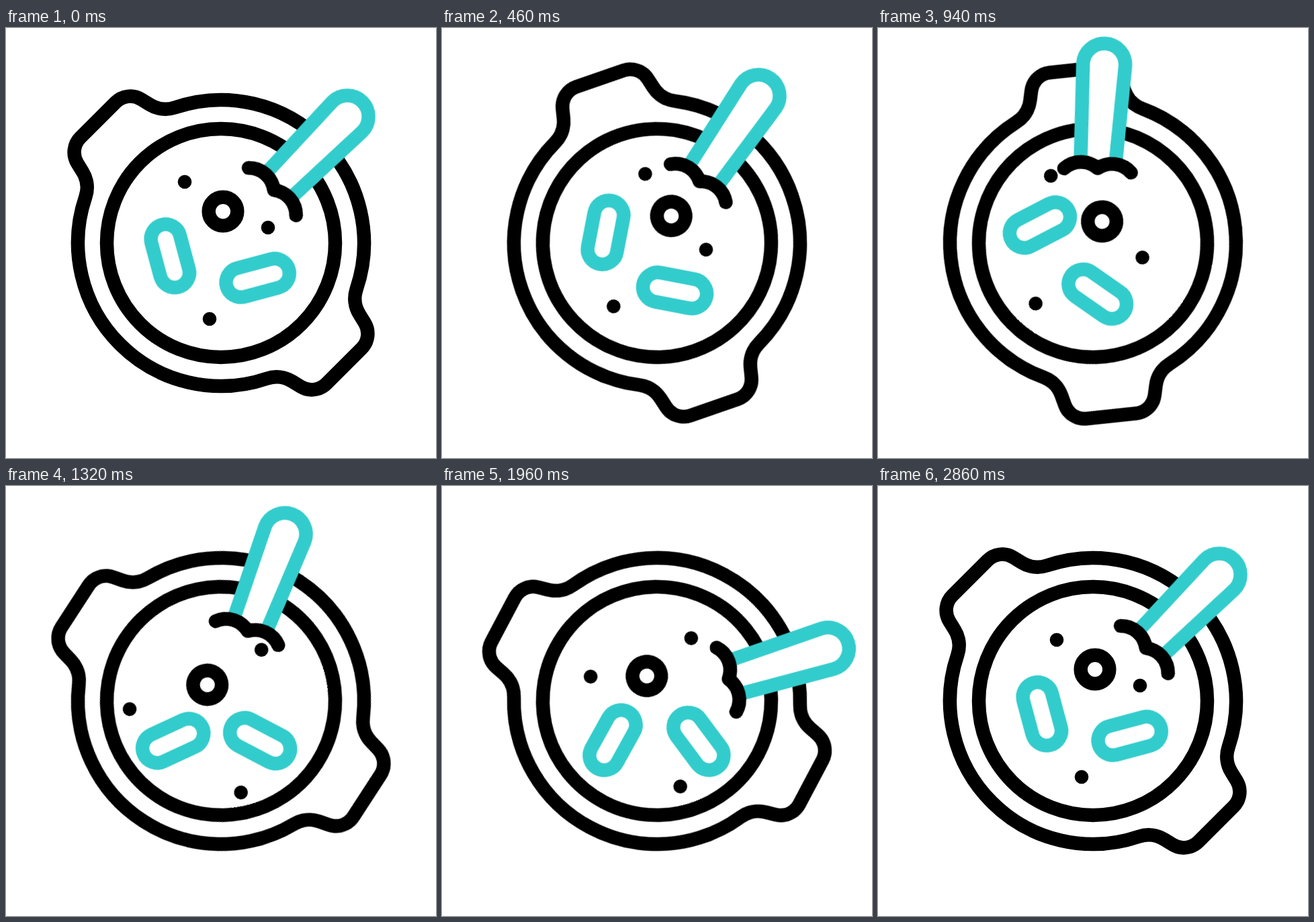
Recreate the animation shown at these times as an HTML page. Size 640 px wide and 640 px high, loop 3600 ms.

```html
<!DOCTYPE html>
<html lang="en">
<head>
<meta charset="utf-8">
<title>Stirring pot</title>
<style>
  html, body { margin: 0; width: 100%; height: 100%; overflow: hidden; background: #fff; }
  svg { display: block; width: 100vw; height: 100vh; }

  .line { fill: none; stroke: #000; stroke-width: 20.5; stroke-linecap: round; stroke-linejoin: round; }
  .teal { stroke: #33cccc; stroke-linecap: butt; }

  /* every part shares one 3.6 s loop; most segments ease like a smoothstep */
  .pot, .spoon, .drift, .turn {
    animation: 3600ms cubic-bezier(.333, 0, .667, 1) infinite;
    transform-origin: 0 0;
  }
  .pot { animation-name: pot; }
  .spoon { animation-name: spoon; }
  .early { animation-name: early; }
  .middle { animation-name: middle; }
  .late { animation-name: late; }
  .turn-a { animation-name: turn-a; }
  .turn-b { animation-name: turn-b; }

  @keyframes pot {
    0% { transform: rotate(0deg); animation-timing-function: cubic-bezier(.39, 0, .667, 1); }
    22.5% { transform: rotate(45deg); }
    43.33% { transform: rotate(-30deg); animation-timing-function: cubic-bezier(.39, 0, .3, 1); }
    75%, 100% { transform: rotate(0deg); }
  }
  @keyframes spoon {
    0% { transform: rotate(45deg); animation-timing-function: cubic-bezier(.56, 0, .7, 1); }
    30.56% { transform: rotate(0deg); }
    48.19% { transform: rotate(75deg); animation-timing-function: cubic-bezier(.55, 0, .36, 1); }
    77.78%, 100% { transform: rotate(45deg); }
  }

  /* ingredients slide out by --x, --y and back, in three waves */
  @keyframes early {
    0%, 7.78% { transform: translate(0px, 0px); }
    36.39% { transform: translate(var(--x), var(--y)); }
    66.94%, 100% { transform: translate(0px, 0px); }
  }
  @keyframes middle {
    0%, 15% { transform: translate(0px, 0px); }
    42.5% { transform: translate(var(--x), var(--y)); }
    71.53%, 100% { transform: translate(0px, 0px); }
  }
  @keyframes late {
    0%, 20.69% { transform: translate(0px, 0px); }
    47.92% { transform: translate(var(--x), var(--y)); animation-timing-function: cubic-bezier(.25, 0, .54, 1); }
    79.44%, 100% { transform: translate(0px, 0px); }
  }
  @keyframes turn-a {
    0%, 14.44% { transform: rotate(0deg); }
    42.92% { transform: rotate(105deg); }
    68.89%, 100% { transform: rotate(0deg); }
  }
  @keyframes turn-b {
    0%, 19.58% { transform: rotate(0deg); }
    50.42% { transform: rotate(94deg); }
    72.22%, 100% { transform: rotate(0deg); }
  }
</style>
</head>
<body>
<svg viewBox="-320 -320 640 640">
  <g class="pot">
    <path class="line" transform="rotate(45)" d="M191.1 94
      A44 44 0 0 1 220.6 70.7 L235.1 67.2 A31 31 0 0 0 259 37
      V-37 A31 31 0 0 0 235.1 -67.2 L220.6 -70.7 A44 44 0 0 1 191.1 -94
      A213 213 0 0 0 -191.1 -94
      A44 44 0 0 1 -220.6 -70.7 L-235.1 -67.2 A31 31 0 0 0 -259 -37
      V37 A31 31 0 0 0 -235.1 67.2 L-220.6 70.7 A44 44 0 0 1 -191.1 94
      A213 213 0 0 0 191.1 94 Z"/>
    <circle class="line" r="170"/>

    <g class="drift early" style="--x:-81.5px;--y:74.5px"><circle cx="-54" cy="-91" r="10.3"/></g>
    <g class="drift early" style="--x:-17.8px;--y:19.2px"><circle class="line" cx="3" cy="-47" r="21.3"/></g>
    <g class="drift middle" style="--x:20px;--y:29.7px"><circle cx="-17" cy="113" r="10.3"/></g>
    <g class="drift late" style="--x:7.5px;--y:-62px"><circle cx="70" cy="-23" r="10.3"/></g>

    <g class="drift middle" style="--x:-7.2px;--y:27px">
      <g transform="translate(-75.7 19.2) rotate(75)">
        <rect class="line teal turn turn-a" x="-48" y="-22" width="96" height="44" rx="22"/>
      </g>
    </g>
    <g class="drift late" style="--x:-16px;--y:28.5px">
      <g transform="translate(54.7 52) rotate(-15)">
        <rect class="line teal turn turn-b" x="-48" y="-22" width="96" height="44" rx="22"/>
      </g>
    </g>
  </g>

  <g class="spoon">
    <path class="line teal" style="fill:#fff" d="M-26 -118 L-31.5 -266 A31.5 31.5 0 0 1 31.5 -266 L26 -118"/>
    <path class="line" d="M-50 -108 A38 38 0 0 1 0 -111.5 A38 38 0 0 1 50 -108"/>
  </g>
</svg>
</body>
</html>
```
